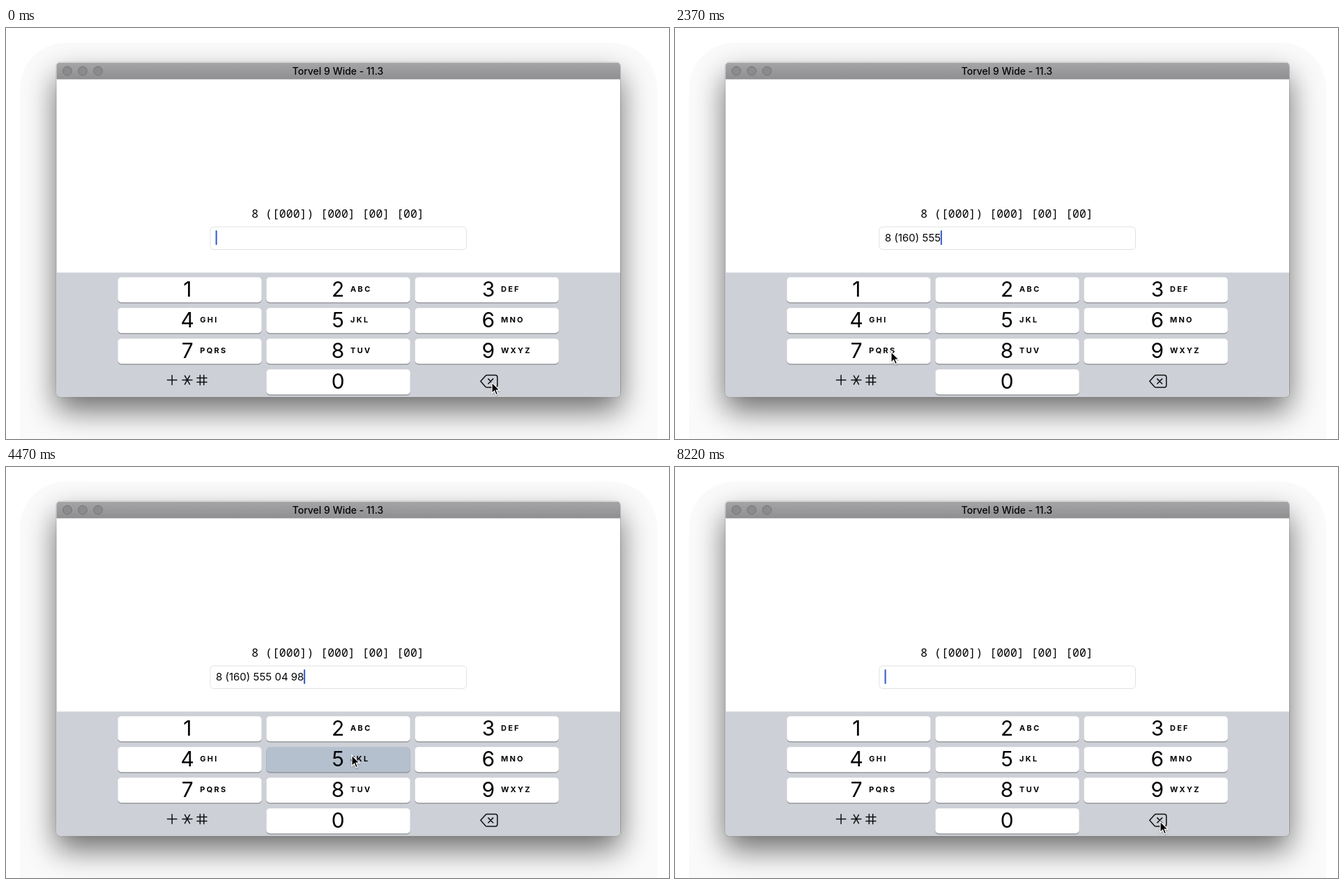
These frames come from a looping animation (951 px wide and 589 px high, 8.46 s). An HTML page:

```html
<!DOCTYPE html>
<html lang="en">
<head>
<meta charset="utf-8">
<title>Masked phone input</title>
<style>
  html, body { margin: 0; width: 100%; height: 100%; overflow: hidden; background: #fff; }
  svg { display: block; width: 100vw; height: 100vh; }
  text { font-family: Inter, Roboto, sans-serif; fill: #050506; white-space: pre; }
  .title { font-size: 14px; font-weight: 500; text-anchor: middle; }
  .mask { font: 500 16.5px "Noto Sans Mono", monospace; text-anchor: middle; }
  .digit { font-size: 30px; text-anchor: middle; }
  .abc { font-size: 11px; font-weight: 700; letter-spacing: 2.3px; }
  .line { fill: none; stroke: #101012; stroke-width: 1.5; stroke-linecap: round; stroke-linejoin: round; }
</style>
</head>
<body>
<svg viewBox="0 0 951 589">
  <defs>
    <linearGradient id="bar" x2="0" y2="1">
      <stop stop-color="#a5a4a7"/><stop offset="1" stop-color="#8f8e91"/>
    </linearGradient>
    <filter id="blur" x="-20%" y="-30%" width="140%" height="160%"><feGaussianBlur stdDeviation="22"/></filter>
    <filter id="soft" x="-50%" y="-50%" width="200%" height="200%">
      <feDropShadow dx="0" dy="1" stdDeviation="1" flood-opacity=".35"/>
    </filter>
    <clipPath id="win"><rect x="72.5" y="49.5" width="808.5" height="479" rx="5"/></clipPath>
  </defs>

  <rect x="20" y="21" width="914" height="640" rx="65" opacity=".018"/>
  <rect x="72" y="69" width="809" height="479" rx="5" opacity=".57" filter="url(#blur)"/>
  <rect x="72" y="49" width="809.5" height="480" rx="5.5" fill="none" stroke="#000" stroke-opacity=".16"/>

  <g clip-path="url(#win)">
    <rect x="72" y="49" width="810" height="480" fill="#fff"/>
    <rect x="72" y="49.5" width="810" height="24" fill="url(#bar)"/>
    <rect x="72" y="350.5" width="810" height="179" fill="#cdd0d6"/>
  </g>
  <g id="lights" fill="#8b8a8d" stroke="#747376"></g>
  <text class="title" x="476" y="67">Torvel 9 Wide - 11.3</text>

  <text class="mask" x="476" y="271.5">8 ([000]) [000] [00] [00]</text>
  <rect x="293" y="285" width="367.5" height="32.5" rx="5" fill="#fff" stroke="#e1e1e3"/>
  <text id="value" x="301" y="306" font-size="15"></text>
  <rect id="caret" y="290" width="2.2" height="21" rx="1" fill="#4166cc"/>

  <g id="keys"></g>
  <path class="line" d="M231.5 504.5H245M238.2 497.8V511.2M253 504.5H267M256.5 498.4L263.5 510.6M263.5 498.4L256.5 510.6
    M274 501.5H288M274 507.5H288M278.4 497.5V511.5M283.8 497.5V511.5"/>
  <g transform="translate(692.8 506.3)">
    <path id="erase" class="line" d="M-12 0L-5.2 -7.6Q-4.2 -8.7 -2.8 -8.7H9Q12 -8.7 12 -5.7V5.7Q12 8.7 9 8.7H-2.8Q-4.2 8.7 -5.2 7.6Z"/>
    <path id="cross" class="line" d="M-1 -3.4L5.8 3.4M5.8 -3.4L-1 3.4"/>
  </g>

  <path id="pointer" d="M0 0V15.4L3.6 12.1L5.9 17.7L8.5 16.6L6.2 11.1H11Z" stroke="#fff" stroke-width="1.2" filter="url(#soft)"/>
</svg>
<script>
const LOOP = 8460;
const PHONE = '8 (160) 555 04 98';
const TYPE_START = 720, ROW_TIME = 870, KEY_TIME = 210, KEY_HOLD = 85;
const ERASE_START = 6090, ERASE_STEP = 128, ERASE_HOLD = 70;
const ERASE_END = ERASE_START + ERASE_STEP * (PHONE.length - 1) + ERASE_HOLD;
const $ = id => document.getElementById(id);

const range = n => [...Array(n).keys()];
const ramp = (t, a, b) => Math.min(1, Math.max(0, (t - a) / (b - a)));
const ease = p => p * p * (3 - 2 * p);

// Keys 1 to 9, then 0, are tapped row by row; a last tap on the full field is refused.
const taps = range(10).map(i => {
  const row = Math.floor(i / 3), col = i % 3;
  const down = TYPE_START + ROW_TIME * row + KEY_TIME * col;
  return { key: (i + 1) % 10, row, col, down, up: down + KEY_HOLD };
});
const refused = { key: 5, down: 4440, up: 4560 };
const allTaps = [...taps, refused];

// The pointer leaves each key on release and rests on the next one before the tap.
const home = { x: 697, y: 508 };
const moves = taps.slice(0, 9).map(({ row, col, down }, i) => ({
  from: i ? taps[i - 1].up : 270,
  to: down - (col ? 30 : 90),
  x: 310 + 190 * col,
  y: 370 + 47 * row
}));
moves.push(
  { from: taps[8].up, to: 3240, x: 529, y: 507 },
  { from: 3240, to: 3420, x: 520, y: 518 },
  { from: 3750, to: 4320, x: 496, y: 413 },
  { from: 4860, to: 5610, x: 696, y: 508 }
);

function pointerAt(t) {
  let { x, y } = home;
  for (const m of moves) {
    const p = ease(ramp(t, m.from, m.to));
    x += (m.x - x) * p;
    y += (m.y - y) * p;
  }
  return [x, y];
}

function textAt(t) {
  if (t >= ERASE_START) {
    const erased = Math.floor((t - ERASE_START) / ERASE_STEP) + 1;
    return PHONE.slice(0, Math.max(0, PHONE.length - erased));
  }
  const typed = taps.filter(p => t >= p.up).length;
  const mask = new RegExp(`^8 \\((\\D*\\d){${typed}}`);
  return typed ? PHONE.match(mask)[0] : '';
}

// The caret stays solid after an edit, then blinks.
function caretAt(t) {
  if (t >= ERASE_START && t < ERASE_END) return 1;
  const edits = [ERASE_END - LOOP, ...allTaps.map(p => p.up), ERASE_END];
  const phase = (t - Math.max(...edits.filter(e => e <= t))) % 1050;
  return 1 - ramp(phase, 525, 675) + ramp(phase, 975, 1040);
}

function erasing(t) {
  return t >= ERASE_START && t < ERASE_END && (t - ERASE_START) % ERASE_STEP < ERASE_HOLD;
}

const letters = ['', '', 'ABC', 'DEF', 'GHI', 'JKL', 'MNO', 'PQRS', 'TUV', 'WXYZ'];
function keyMarkup(n) {
  const col = n ? (n - 1) % 3 : 1, row = n ? Math.floor((n - 1) / 3) : 3;
  const x = 160.3 + col * 213.1, y = 357.2 + row * 44, mid = 260.3 + col * 215.8;
  return `<rect x="${x}" y="${y + 1}" width="206.4" height="36.2" rx="5" fill="#898b90"/>
    <rect id="key${n}" x="${x}" y="${y}" width="206.4" height="36" rx="5"/>
    <text class="digit" x="${mid}" y="${y + 27.3}">${n}</text>
    <text class="abc" x="${mid + 18}" y="${y + 21}">${letters[n]}</text>`;
}
$('keys').innerHTML = range(10).map(keyMarkup).join('');
$('lights').innerHTML = range(3).map(i => `<circle cx="${88 + 22 * i}" cy="61.5" r="6.3"/>`).join('');

function draw(t) {
  const held = allTaps.find(p => t >= p.down && t < p.up);
  range(10).forEach(n => $('key' + n).setAttribute('fill', held && held.key === n ? '#b4c0ce' : '#fff'));

  const value = $('value'), text = textAt(t);
  value.textContent = text;
  $('caret').setAttribute('x', 300.6 + (text ? value.getComputedTextLength() : 0));
  $('caret').setAttribute('opacity', caretAt(t));

  const down = erasing(t);
  $('erase').style.fill = down ? '#101012' : 'none';
  $('cross').style.stroke = down ? '#cdd0d6' : '#101012';
  $('pointer').setAttribute('transform', `translate(${pointerAt(t)})`);
}

function tick() {
  draw(performance.now() % LOOP);
  requestAnimationFrame(tick);
}
tick();
</script>
</body>
</html>
```
